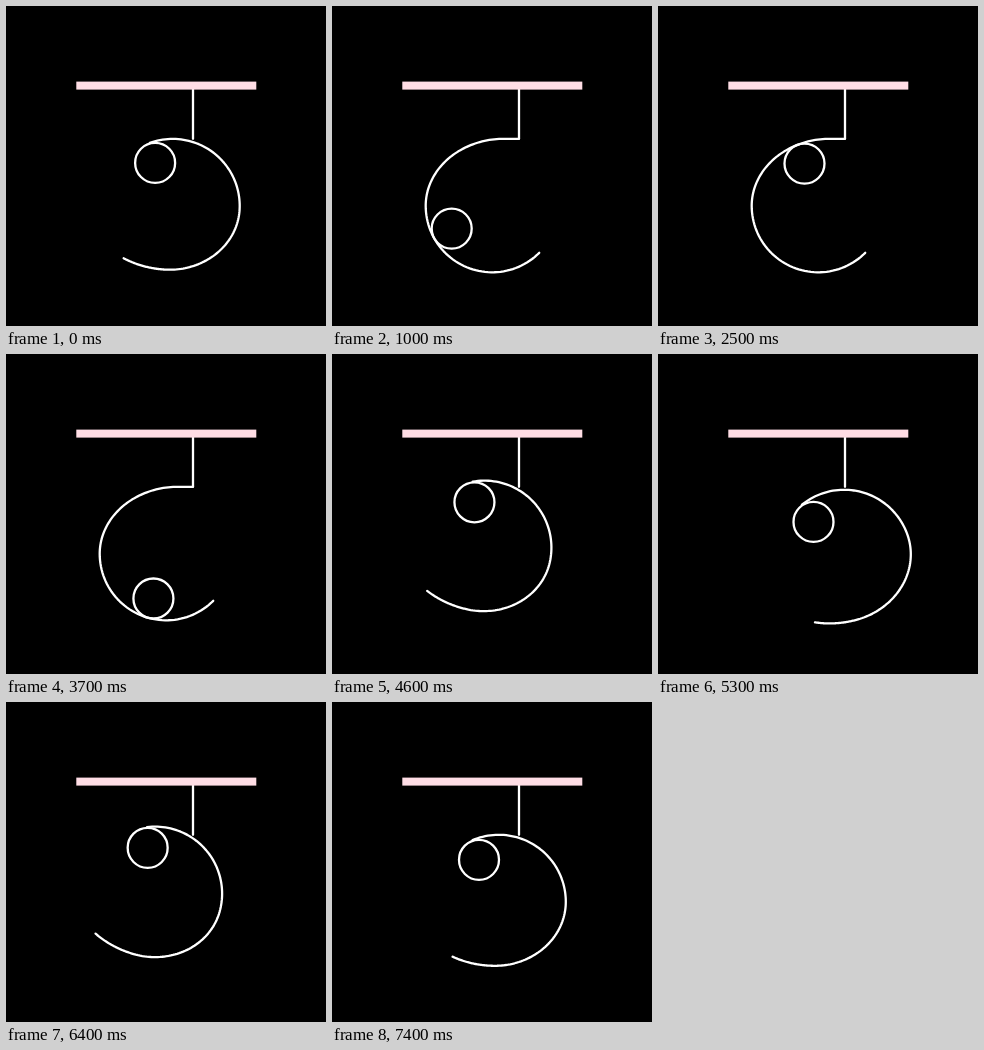
Recreate the animation shown at these times as an HTML page with a canvas. Size 320 px wide and 320 px high, loop 8 s.

```html
<!DOCTYPE html>
<html lang="en">
<head>
<meta charset="utf-8">
<title>Swinging curl</title>
<style>
html, body { margin: 0; width: 100%; height: 100%; overflow: hidden; background: #000; }
canvas { display: block; width: 100vmin; height: 100vmin; }
</style>
</head>
<body>
<canvas id="stage" width="320" height="320"></canvas>
<script>
const ctx = document.getElementById('stage').getContext('2d');
const LOOP = 8000, STEP = 100, RADIUS = 20, SAMPLES = 50;
const PIVOT = [187, 132.8], CENTRE = [165, 198], REST = [147, 157.8];
const LAND = 600, TURN = 2162, STOP = 3700, SPEED = 0.139;

const rad = deg => deg * Math.PI / 180;
const mix = (a, b, k) => a + (b - a) * k;
const mixPt = (a, b, k) => [mix(a[0], b[0], k), mix(a[1], b[1], k)];
const ease = k => (1 - Math.cos(Math.PI * k)) / 2;
const span = (t, a, b) => Math.min(1, Math.max(0, (t - a) / (b - a)));

function arc(cx, cy, rx, ry, from, to) {
  return Array.from({ length: SAMPLES + 1 }, (_, i) => {
    const a = rad(mix(from, to, i / SAMPLES));
    return [cx + rx * Math.cos(a), cy + ry * Math.sin(a)];
  });
}

function turn([x, y], [cx, cy], deg) {
  const c = Math.cos(rad(deg)), s = Math.sin(rad(deg));
  return [cx + (x - cx) * c - (y - cy) * s, cy + (x - cx) * s + (y - cy) * c];
}

// The hook's first piece is a flat arc: the straight bit beside the stem
const HOOK = [
  ...arc(179.5, 132.8, 7.5, 0, 0, 180),
  ...arc(172, 199.8, 78.3, 67, 270, 180),
  ...arc(160.2, 199.8, 66.5, 66.5, 180, 45)
];
const CURL = [
  ...arc(166.8, 199.8, 67, 67, -113, 0),
  ...arc(162.8, 199.8, 71, 64, 0, 90),
  ...arc(162.8, 199.8, 82, 64, 90, 121)
];
const OPENING = CURL.map(p => turn(p, CENTRE, 3));

// Swing of the curl: time and degrees at each turning point
const SWING = [[4100, 0], [4450, 14.5], [5500, -19], [6120, 25], [6400, 16], [6530, 25], [6800, 0]];

function tiltAt(t) {
  const i = SWING.findIndex(key => t < key[0]);
  if (i < 1) return 0;
  const [t0, a] = SWING[i - 1], [t1, b] = SWING[i];
  return mix(a, b, ease(span(t, t0, t1)));
}

// Ring centre while it rolls inside the hook, up to the stem and back
function rollAt(t) {
  let left = 1.5 + SPEED * Math.abs(t - TURN);
  for (let i = 1; i < HOOK.length; i++) {
    const [x, y] = HOOK[i - 1], dx = HOOK[i][0] - x, dy = HOOK[i][1] - y;
    const len = Math.hypot(dx, dy);
    if (len && left <= len) {
      return [x + (dx * left + dy * RADIUS) / len, y + (dy * left - dx * RADIUS) / len];
    }
    left -= len;
  }
}

function pose(t) {
  if (t < STOP) {
    const k = ease(span(t, 100, 700)), fall = span(t, 100, LAND);
    return {
      path: HOOK.map((p, i) => mixPt(OPENING[i], p, k)),
      ring: mixPt(turn(REST, CENTRE, 3), rollAt(Math.max(t, LAND)), fall * fall),
      tilt: 0
    };
  }
  const k = ease(span(t, STOP, 4200));
  return {
    path: HOOK.map((p, i) => mixPt(p, CURL[i], k)),
    ring: mixPt(rollAt(STOP), REST, k),
    tilt: tiltAt(t)
  };
}

function strokeLine(points) {
  ctx.beginPath();
  points.forEach(p => ctx.lineTo(...p));
  ctx.stroke();
}

function draw(t) {
  const { path, ring, tilt } = pose(t);
  ctx.fillStyle = '#000';
  ctx.fillRect(0, 0, 320, 320);
  ctx.strokeStyle = '#fff';
  ctx.lineWidth = 2.3;
  ctx.lineCap = ctx.lineJoin = 'round';

  strokeLine([[187, 82], PIVOT]);
  ctx.fillStyle = '#ffdde5';
  ctx.fillRect(70.3, 75.6, 180, 8);

  strokeLine(path.map(p => turn(p, PIVOT, tilt)));
  ctx.beginPath();
  ctx.arc(...turn(ring, PIVOT, tilt), RADIUS, 0, Math.PI * 2);
  ctx.stroke();
}

const start = performance.now();
function frame() {
  const t = (performance.now() - start) % LOOP;
  const step = Math.floor(t / STEP) * STEP;
  draw(step < 200 ? 0 : step);
  requestAnimationFrame(frame);
}
frame();
</script>
</body>
</html>
```
